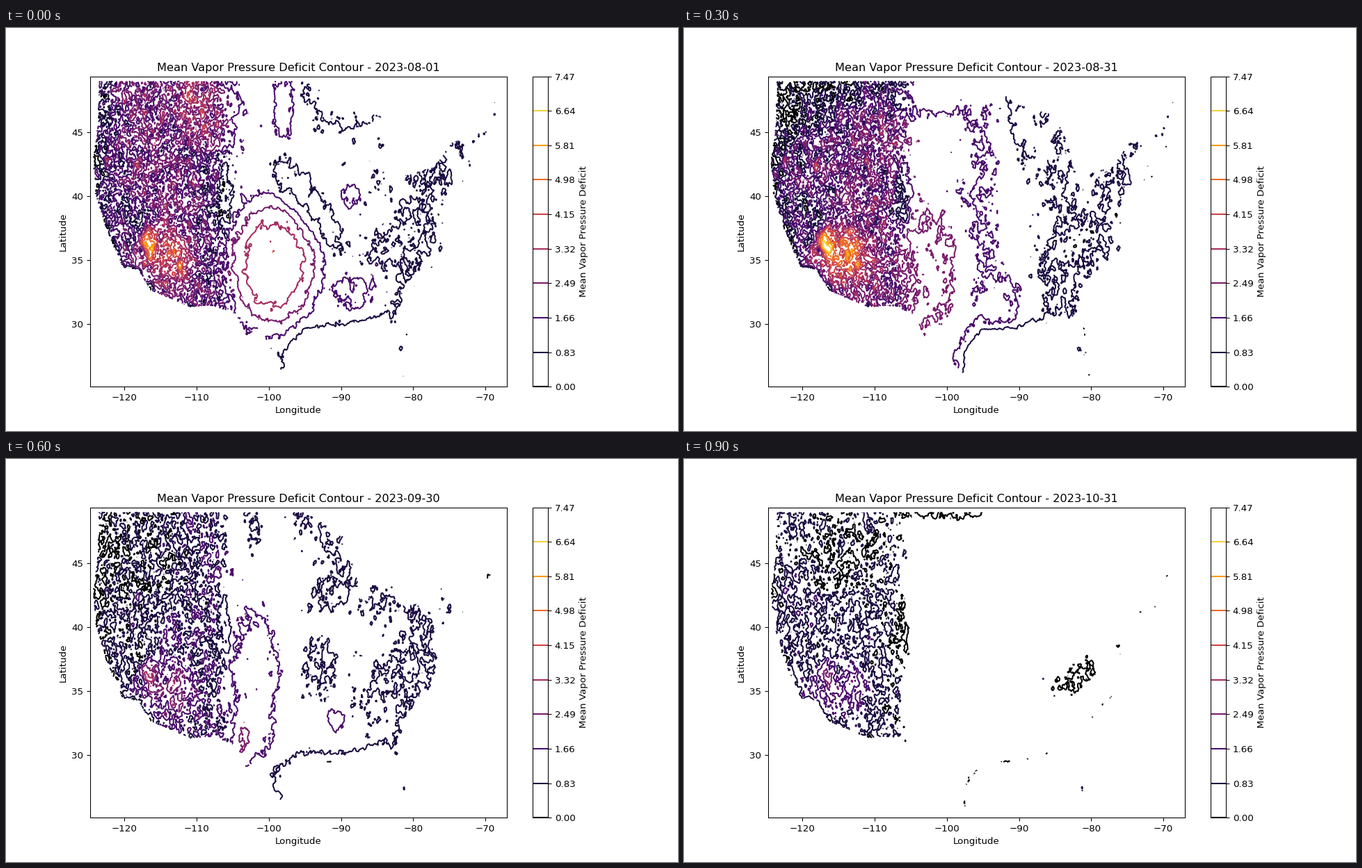
These frames come from a looping animation (966 px wide and 580 px high, 1 s). A matplotlib script:

```python
import numpy as np
import matplotlib.pyplot as plt
from matplotlib.animation import FuncAnimation
from matplotlib.path import Path

DPI = 96.6
WEST, EAST, SOUTH, NORTH = -124.7667, -67.0583, 25.0667, 49.4
LEVELS = np.linspace(0, 7.47, 10)
COLORS = plt.get_cmap("inferno")(np.linspace(0, 1, 10))
COLORS[-1, 3] = 0  # the top level coincides with the maximum and stays empty

# One grid cell per stage pixel inside the axes
X, Y = np.meshgrid(np.arange(121.0, 720), np.arange(70.0, 517))
LON = np.linspace(WEST, EAST, X.shape[1])
LAT = np.linspace(NORTH, SOUTH, X.shape[0])

PACIFIC = [(134, 76), (132, 140), (125, 190), (129, 240), (145, 293), (168, 345), (190, 348),
           (208, 378)]
MEXICO = [(265, 402), (298, 400), (330, 412), (345, 444), (366, 430), (388, 485), (404, 501)]
GULF = [(404, 501), (405, 470), (430, 436), (480, 436), (540, 420), (556, 440), (562, 480),
        (575, 515)]
ATLANTIC = [(584, 505), (583, 475), (571, 410), (590, 365), (633, 325), (626, 270), (655, 222),
            (690, 208), (690, 175), (717, 140)]
LAKES = [(702, 105), (680, 150), (640, 165), (615, 200), (575, 212), (560, 205), (552, 165),
         (540, 142), (524, 165), (520, 205), (507, 200), (503, 150), (540, 128), (480, 110),
         (430, 76)]
LAND = Path(PACIFIC + MEXICO + GULF + ATLANTIC + LAKES).contains_points(
    np.c_[X.ravel(), Y.ravel()]).reshape(X.shape)

rng = np.random.default_rng(8)
FX, FY = np.meshgrid(np.fft.fftfreq(X.shape[1]), np.fft.fftfreq(X.shape[0]))
SPECTRUM = (1 + (15 * FX) ** 2 + (24 * FY) ** 2) ** -.95


def texture():
    """Unit-variance fractal noise, stretched along the mountain ranges."""
    noise = np.fft.ifft2(np.fft.fft2(rng.normal(size=X.shape)) * SPECTRUM).real
    return noise / noise.std()


def bump(height, x, y, rx, ry, tilt=0):
    """Flat-topped ellipse with a steep rim."""
    c, s = np.cos(np.radians(tilt)), np.sin(np.radians(tilt))
    u, v = X - x, Y - y
    r2 = ((u * c + v * s) / rx) ** 2 + ((v * c - u * s) / ry) ** 2
    return height * np.exp(-r2 ** 2)


def coast_distance():
    nearest = np.full(X.shape, np.inf)
    for shore in (PACIFIC, GULF, ATLANTIC):
        for (x0, y0), (x1, y1) in zip(shore, shore[1:]):
            dx, dy = x1 - x0, y1 - y0
            t = np.clip(((X - x0) * dx + (Y - y0) * dy) / (dx * dx + dy * dy), 0, 1)
            nearest = np.minimum(nearest, np.hypot(X - x0 - t * dx, Y - y0 - t * dy))
    return nearest


MARINE = 1 - .75 * np.exp(-coast_distance() / 9)
TERRAIN = texture()
RUGGED = .14 + .55 / (1 + np.exp((X - 318) / 7)) + bump(.14, 565, 300, 75, 35, -40)
RELIEF = (bump(1.9, 225, 335, 48, 48, 20)          # southwestern desert
          + bump(2.6, 203, 311, 9, 17, -20)        # deep desert valley
          + bump(-1.2, 313, 245, 14, 48)           # high Rockies
          + bump(-1.1, 183, 290, 9, 55, -20)       # Sierra
          + bump(-.8, 150, 120, 14, 50)            # Cascades
          + bump(-.5, 555, 312, 48, 20, -35))      # Appalachians


def weather(dryness, profile, *systems):
    """Deficit in contour steps: west-to-east profile, relief, weather systems, texture."""
    base = np.interp(X, (130, 200, 260, 330, 400, 470, 540, 620, 720), profile)
    rough = RUGGED * np.sqrt(dryness) * (.85 * TERRAIN + .5 * texture())
    field = (base + dryness * RELIEF + sum(systems)) * MARINE + rough
    return np.where(LAND, field, np.nan)


aug_01 = weather(
    1, (1.9, 2.6, 2.4, 1.6, 1.5, 1.4, 1.25, 1, .7),
    bump(1.2, 285, 115, 45, 55), bump(.8, 400, 115, 18, 50), bump(-.8, 490, 90, 65, 55),
    bump(-.9, 430, 252, 82, 28, 55), bump(3, 385, 340, 62, 90), bump(.8, 495, 243, 16, 22),
    bump(.8, 505, 380, 42, 36))
aug_11 = weather(
    .9, (1.8, 2.5, 2.3, 1.8, 1.6, 1.5, 1.3, 1, .7),
    bump(-.9, 475, 100, 75, 50), bump(.6, 370, 190, 22, 38), bump(.7, 410, 282, 45, 15),
    bump(-.8, 428, 205, 14, 34), bump(-.6, 505, 235, 30, 28), bump(-.5, 540, 335, 88, 52),
    bump(3, 376, 362, 56, 55), bump(1.2, 462, 382, 46, 36), bump(1.4, 388, 445, 36, 50),
    bump(1, 566, 440, 12, 34))
aug_21 = weather(
    .7, (1.4, .5, 1.1, 1, .9, .7, .7, .7, .7),
    bump(1.1, 165, 100, 42, 65, 40), bump(-.6, 193, 255, 28, 75), bump(.8, 285, 285, 38, 110),
    bump(2.4, 366, 308, 78, 164), bump(.5, 400, 265, 24, 32), bump(.8, 385, 380, 34, 62),
    bump(1.2, 460, 375, 42, 62), bump(.65, 575, 335, 150, 122), bump(.6, 542, 395, 26, 22),
    bump(.6, 608, 268, 13, 22))
aug_31 = weather(
    1.1, (1.8, 2.3, 2.6, 2.5, 2.3, 1.5, 1.1, .95, .7),
    bump(-1.6, 160, 90, 110, 68, -25), bump(-1, 330, 82, 120, 44), bump(.8, 355, 350, 45, 100),
    bump(1, 215, 320, 34, 44), bump(.7, 460, 400, 32, 45), bump(-.7, 490, 120, 28, 75),
    bump(-.4, 570, 225, 22, 40))
sep_20 = weather(
    .65, (1.2, 1.4, 1.5, 1.5, 1.4, 1.3, 1.15, 1, .6),
    bump(-.5, 210, 150, 70, 85), bump(.9, 355, 310, 38, 135), bump(.9, 358, 405, 36, 45),
    bump(.8, 343, 405, 14, 28), bump(-.7, 462, 195, 36, 26), bump(-.7, 448, 305, 28, 62),
    bump(-.8, 350, 105, 18, 48), bump(.9, 468, 382, 24, 28), bump(-.5, 550, 120, 70, 80))
oct_10 = weather(
    .6, (.4, 1.3, 1.5, 1.5, 1.4, 1.3, 1.2, 1.1, .9),
    bump(-.9, 185, 120, 85, 105, -20), bump(-.85, 555, 80, 270, 105, 28),
    bump(.8, 368, 298, 46, 78), bump(.8, 338, 398, 16, 46), bump(-.8, 425, 455, 68, 36),
    bump(.9, 475, 370, 14, 26), bump(.8, 543, 390, 13, 11))
oct_31 = weather(
    .35, (1.2, 1.2, 1, .5, .5, .48, .45, .45, .42),
    bump(-.8, 215, 130, 70, 75), bump(.5, 190, 335, 45, 40), bump(-.6, 380, 74, 85, 18),
    bump(-.35, 568, 315, 30, 20, -45), bump(.8, 569, 450, 16, 66))


def between(before, after):
    return (before + after) / 2


FIELDS = (aug_01, aug_11, aug_21, aug_31, between(aug_31, sep_20), sep_20,
          between(sep_20, oct_10), oct_10, between(oct_10, oct_31), oct_31)

plt.rcParams["font.family"] = "DejaVu Sans"
fig, ax = plt.subplots(figsize=(966.0001 / DPI, 580.0001 / DPI), dpi=DPI)
key = ax.contour([-100, -90], [30, 40], [[0, 7.47], [0, 7.47]], levels=LEVELS, cmap="inferno")
bar = fig.colorbar(key, ax=ax, label="Mean Vapor Pressure Deficit", format="%.2f")
bar.lines[0].set_color(COLORS)
key.set_visible(False)
ax.set(xlim=(WEST, EAST), ylim=(SOUTH, NORTH), xlabel="Longitude", ylabel="Latitude")
ax.autoscale(False)
drawn = []


def draw(i):
    while drawn:
        drawn.pop().remove()
    drawn.append(ax.contour(LON, LAT, FIELDS[i], range(10), colors=COLORS, linewidths=1.5))
    day = np.datetime64("2023-08-01") + 91 * i // 9
    ax.set_title(f"Mean Vapor Pressure Deficit Contour - {day}")
    return drawn


anim = FuncAnimation(fig, draw, frames=len(FIELDS), init_func=lambda: [], interval=100,
                     repeat=True, repeat_delay=0, blit=False)
plt.show()
```
